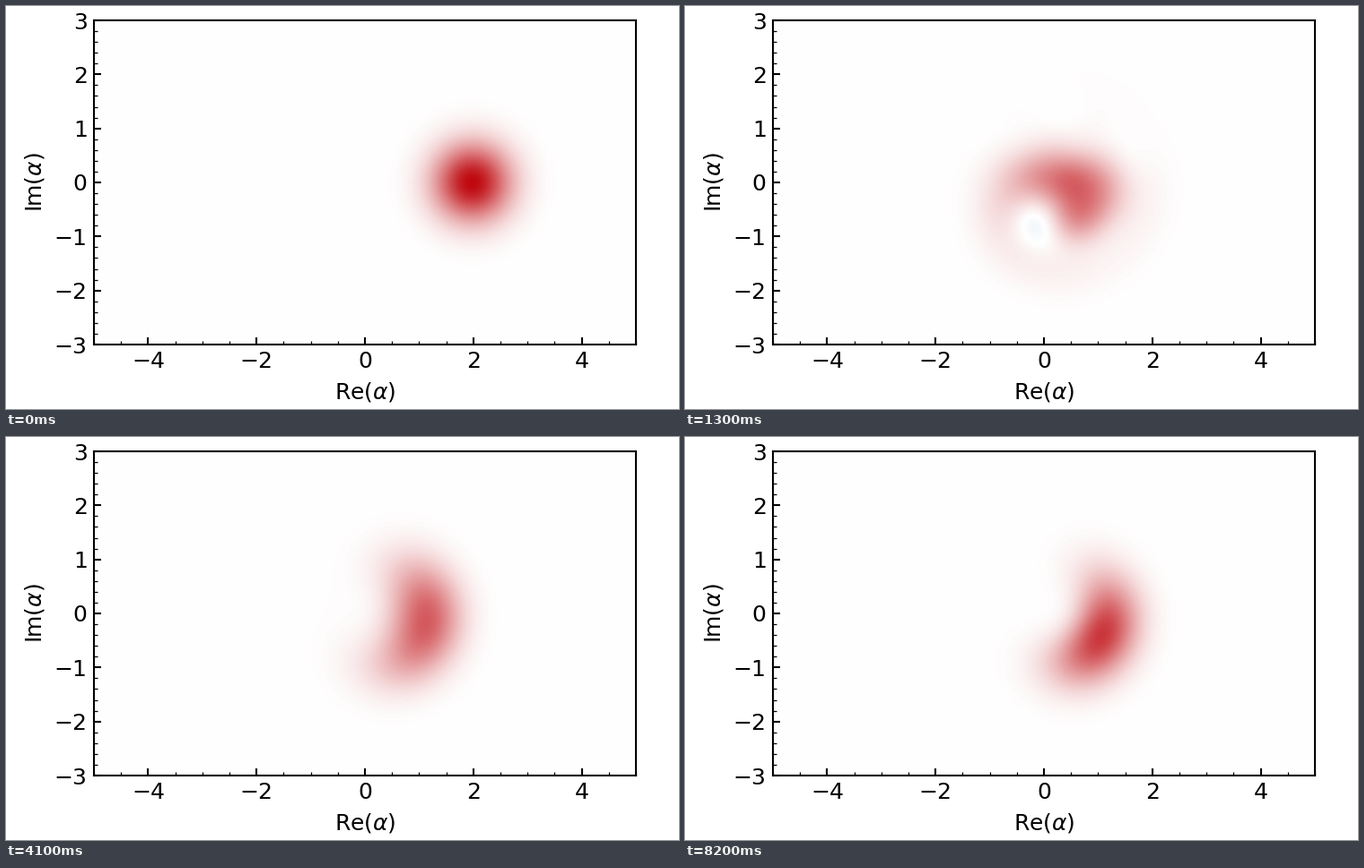
Animation of 750 by 450 pixels, one loop 10 s. Source, as a matplotlib script:

```python
"""Wigner function of a driven, damped Kerr oscillator starting from a coherent state."""
import numpy as np
import matplotlib.pyplot as plt
from matplotlib.animation import FuncAnimation
from matplotlib.colors import LinearSegmentedColormap
from matplotlib.ticker import AutoMinorLocator, MultipleLocator

DIM = 20                             # Fock space cutoff
KERR, DRIVE, LOSS = 1.0, 2.75, 1.4
ALPHA0, T_END = 2.0, 5.0
FRAMES, SUBSTEPS = 100, 14
XMAX, YMAX, GRID = 5, 3, 101


def coherent(alpha):
    c = np.ones(DIM, complex)
    for n in range(1, DIM):
        c[n] = c[n - 1] * alpha / np.sqrt(n)
    return c / np.linalg.norm(c)


def evolve():
    """Density matrices of the master equation at every frame (RK4)."""
    a = np.diag(np.sqrt(np.arange(1, DIM)), 1).astype(complex)
    ad = a.conj().T
    ham = -KERR * ad @ ad @ a @ a + DRIVE * (a + ad)
    gen = -1j * ham - LOSS / 2 * ad @ a

    def rhs(r):
        half = gen @ r
        return half + half.conj().T + LOSS * a @ r @ ad

    psi = coherent(ALPHA0)
    rho = np.outer(psi, psi.conj())
    dt = T_END / (FRAMES - 1) / SUBSTEPS
    states = [rho]
    for _ in range(FRAMES - 1):
        for _ in range(SUBSTEPS):
            k1 = rhs(rho)
            k2 = rhs(rho + dt / 2 * k1)
            k3 = rhs(rho + dt / 2 * k2)
            k4 = rhs(rho + dt * k3)
            rho = rho + dt / 6 * (k1 + 2 * k2 + 2 * k3 + k4)
        states.append(rho)
    return np.array(states)


def wigner(states):
    """Wigner maps in units of 2/pi, from the Fock-basis recurrence."""
    x, y = np.meshgrid(np.linspace(-XMAX, XMAX, GRID),
                       np.linspace(-YMAX, YMAX, GRID))
    z = (x + 1j * y).ravel()
    row = [np.exp(-2 * abs(z) ** 2).astype(complex)]
    for n in range(1, DIM):
        row.append(2 * z * row[-1] / np.sqrt(n))
    basis, coefs = list(row), [(0, n) for n in range(DIM)]
    for m in range(1, DIM):
        prev, row = row, [None] * DIM
        row[m] = (2 * z.conj() * prev[m] - np.sqrt(m) * prev[m - 1]) / np.sqrt(m)
        for n in range(m + 1, DIM):
            row[n] = (2 * z * row[n - 1] - np.sqrt(m) * prev[n - 1]) / np.sqrt(n)
        basis += row[m:]
        coefs += [(m, n) for n in range(m, DIM)]
    rows, cols = np.array(coefs).T
    weight = np.where(rows == cols, 1, 2)
    maps = ((states[:, rows, cols] * weight) @ np.array(basis)).real
    return maps.reshape(-1, GRID, GRID)


maps = wigner(evolve())

plt.rcParams.update({
    "font.family": "DejaVu Sans", "font.size": 12,
    "axes.linewidth": 1.0,
    "xtick.direction": "in", "ytick.direction": "in",
    "xtick.major.size": 4, "ytick.major.size": 4,
    "xtick.major.width": 1.0, "ytick.major.width": 1.0,
    "xtick.minor.size": 2, "ytick.minor.size": 2,
})
cmap = LinearSegmentedColormap.from_list("wigner", ["#0c5da5", "#ffffff", "#be080e"])

fig = plt.figure(figsize=(5, 3), dpi=150)
ax = fig.add_axes([98 / 750, 72 / 450, 604 / 750, 362 / 450])
image = ax.imshow(maps[0], cmap=cmap, vmin=-1, vmax=1, origin="lower",
                  extent=(-XMAX, XMAX, -YMAX, YMAX), aspect="auto",
                  interpolation="bilinear")
ax.xaxis.set_major_locator(MultipleLocator(2))
ax.yaxis.set_major_locator(MultipleLocator(1))
ax.xaxis.set_minor_locator(AutoMinorLocator(4))
ax.yaxis.set_minor_locator(AutoMinorLocator(5))
ax.set_xlabel(r"$\mathrm{Re}(\alpha)$")
ax.set_ylabel(r"$\mathrm{Im}(\alpha)$")


def update(i):
    image.set_data(maps[i])
    return [image]


anim = FuncAnimation(fig, update, frames=FRAMES, interval=100, repeat=True,
                     repeat_delay=0)
plt.show()
```
